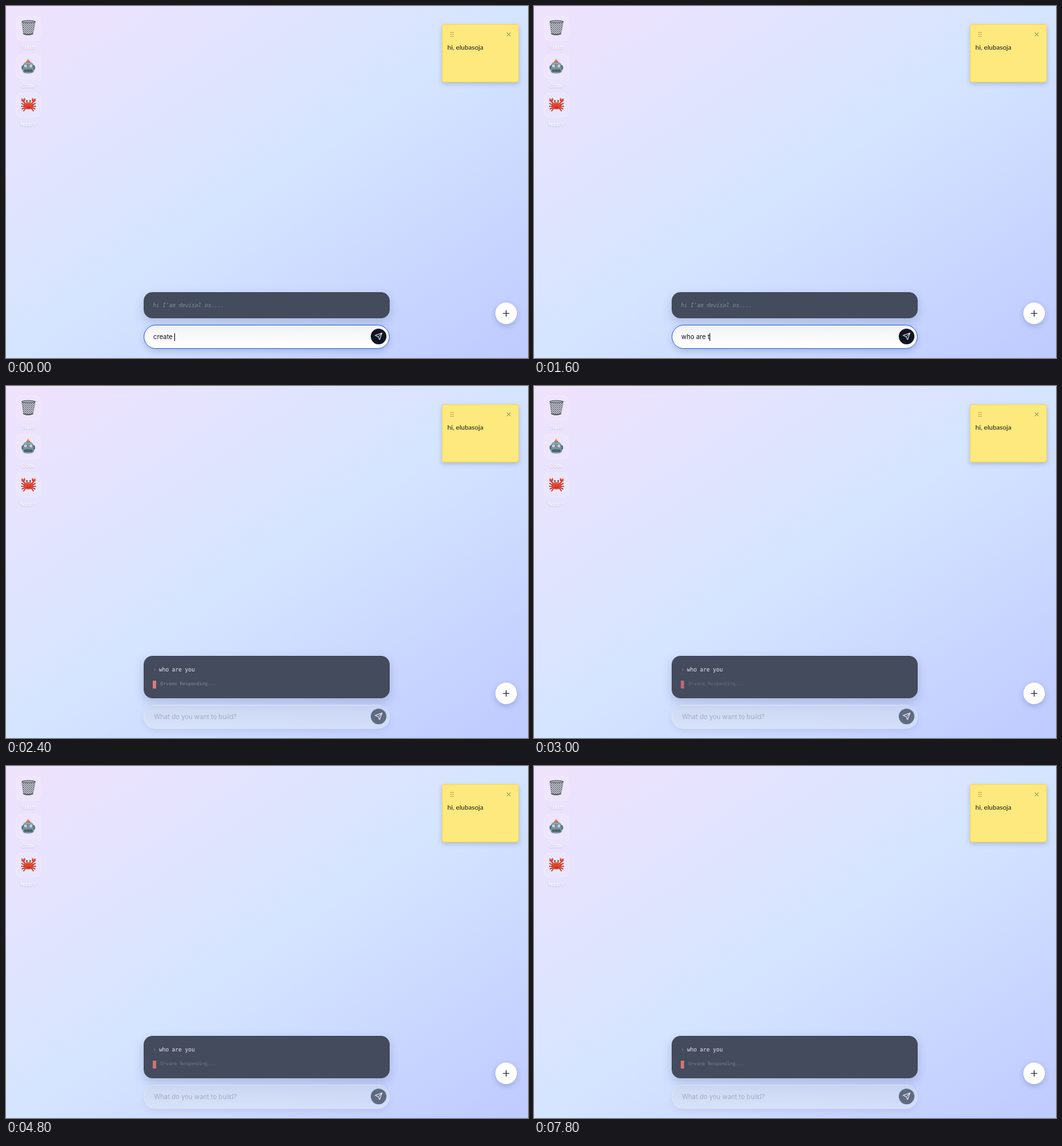
Animation of 800 by 540 pixels, one loop 8 s. Source, as an HTML page:

```html
<!DOCTYPE html>
<html lang="en">
<head>
<meta charset="utf-8">
<title>Desktop prompt</title>
<style>
  html, body { margin: 0; width: 100%; height: 100%; overflow: hidden; }
  #stage {
    position: relative; width: 800px; height: 540px; overflow: hidden;
    background: linear-gradient(to bottom right, #f0e2fd, #d5e5ff 50%, #bfcaff);
    font-family: Inter, sans-serif;
  }
  #stage div, svg { position: absolute; box-sizing: border-box; white-space: pre; }
  svg { left: 0; top: 0; }

  .cell {
    left: 15px; width: 38px; height: 38px; border-radius: 8px;
    background: rgba(255,255,255,.13); border: 1px solid rgba(255,255,255,.16);
  }
  .label {
    left: 4px; width: 60px; height: 12px; line-height: 12px; text-align: center;
    font-size: 8.1px; font-weight: 500; color: #fff;
    text-shadow: 0 1px 2px rgba(70,80,120,.25);
  }
  .note {
    left: 668px; top: 28px; width: 118px; height: 89px; border-radius: 4px;
    background: #fde97d; border: 1px solid #f9da45;
    box-shadow: 0 3px 7px rgba(60,70,110,.25);
    padding: 28px 0 0 7.5px; font: 10.2px/13px Lato, sans-serif; color: #17181c;
  }
  .plus {
    left: 750px; top: 455px; width: 33px; height: 33px; border-radius: 50%;
    background: #fff; box-shadow: 0 3px 8px rgba(40,50,100,.24);
  }

  .panel {
    left: 211px; top: 439px; width: 377px; height: 40px; border-radius: 13px;
    background: #434b5c; border: 1px solid #3e4657;
    box-shadow: 0 6px 15px rgba(50,60,110,.22);
    font: 8.25px/12px "DejaVu Sans Mono", monospace;
  }
  .reply .panel { top: 414px; height: 65px; }
  .greeting { left: 13px; top: 13px; font-style: italic; color: #858b98; }
  .chevron { left: 13.5px; top: 14px; color: #a18d97; }
  .question { left: 22.5px; top: 14px; color: #e8eaee; }
  .status { left: 24.5px; top: 36px; font-size: 7.1px; color: #9ca3af; }
  .spinner {
    left: 13px; top: 37px; width: 5px; height: 12px;
    background: conic-gradient(#b8616b 25%, #ff8583 0) 0 0 / 2px 2px;
  }
  .spinner.solid { background: #e8747b; }

  .prompt {
    left: 210.5px; top: 488.5px; width: 377px; height: 37px; border-radius: 18.5px;
    background: linear-gradient(#f0f2f5, #fff 85%); border: 1.2px solid #2867e6;
    box-shadow: 0 4px 10px rgba(50,60,110,.2);
    padding-left: 14.3px; font-size: 9.9px; line-height: 35px; color: #111319;
  }
  .prompt span { display: inline-block; vertical-align: middle; }
  .caret { width: 1px; height: 12px; background: #111; }
  .hint { color: #a3adc0; }
  .reply .prompt {
    background: linear-gradient(rgba(202,213,235,.65), rgba(221,230,247,.6));
    border-color: rgba(255,255,255,.24); box-shadow: 0 4px 10px rgba(50,60,110,.09);
  }
  .reply .caret { visibility: hidden; }
  .send {
    left: 559px; top: 495px; width: 24px; height: 24px;
    border-radius: 50%; background: #0f1524;
  }
  .reply .send { background: #5f6a83; }
  .idle-only { display: block; }
  .reply-only, .reply .idle-only { display: none; }
  .reply .reply-only { display: block; }
</style>
</head>
<body>
<div id="stage">
  <div class="cell" style="top:15px"></div><div class="label" style="top:57px">Trash</div>
  <div class="cell" style="top:74px"></div><div class="label" style="top:116px">Code</div>
  <div class="cell" style="top:133px"></div><div class="label" style="top:175px">Nipp'r</div>
  <div class="note">hi, elubasoja</div>
  <div class="plus"></div>

  <div class="panel">
    <div class="greeting idle-only">hi I'am devisal os....</div>
    <div class="chevron reply-only">›</div>
    <div class="question reply-only">who are you</div>
    <div class="spinner reply-only"></div>
    <div class="status reply-only">Orvane Responding...</div>
  </div>
  <div class="prompt"><span class="typed"></span><span class="caret"></span><span class="hint">What do you want to build?</span></div>
  <div class="send"></div>

  <svg width="800" height="540" fill="none" stroke-linecap="round" stroke-linejoin="round">
    <defs>
      <pattern id="mesh" width="3" height="3" patternUnits="userSpaceOnUse">
        <path d="M0 0L3 3M3 0L0 3" stroke="#60656e" stroke-width=".7"/>
      </pattern>
    </defs>

    <!-- bin -->
    <path d="M24.3 24L27 43Q34 45.5 41 43L44.7 24Z" fill="#c9cbd5"/>
    <path d="M24.3 24L27 43Q34 45.5 41 43L44.7 24Z" fill="url(#mesh)" stroke="#747984" stroke-width=".8"/>
    <ellipse cx="34.5" cy="24" rx="10.3" ry="1.8" fill="#a3a7b0" stroke="#555a63"/>
    <path d="M27 42.5Q34 45.5 41 42.5" stroke="#4c5059" stroke-width="1.4"/>

    <!-- robot -->
    <path d="M34 82V86" stroke="#e0a33e" stroke-width="2"/>
    <path d="M30.5 87Q31 83 34 83T37.5 87Z" fill="#e5783c"/>
    <rect x="24" y="91" width="20.5" height="7" rx="2" fill="#4d6677"/>
    <path d="M26 92Q27 86 34 86T42.3 92V100Q42 103 34 103T26 100Z" fill="#7897a5" stroke="#587481" stroke-width=".7"/>
    <path d="M28 89Q34 86 40 89" stroke="#abc3cb"/>
    <g fill="#eef4f4" stroke="#53646e" stroke-width=".8">
      <circle cx="30" cy="92" r="2.7"/><circle cx="38.3" cy="92" r="2.7"/>
    </g>
    <circle cx="30" cy="92" r="1" fill="#67a7bc"/><circle cx="38.3" cy="92" r="1" fill="#67a7bc"/>
    <path d="M34.1 93.5L35.3 96H33Z" fill="#d16d46"/>
    <rect x="28" y="97.5" width="12.5" height="3.2" rx="1.2" fill="#324753"/>
    <path d="M30 99H39" stroke="#cbd8d8" stroke-width="1.2" stroke-dasharray="1 1.5" stroke-linecap="butt"/>

    <!-- crab, one side mirrored -->
    <g id="crabSide">
      <path d="M29 152L24 149.5M28 154L23.5 154M28.5 156L24.5 158M30 157L27 161" stroke="#b52a1c" stroke-width="1.4"/>
      <path d="M29 149L26 146" stroke="#d43823" stroke-width="1.8"/>
      <path d="M27.5 147Q21.5 147 24.5 141L26.3 144L28.5 140.8Q31 145 27.5 147Z" fill="#df422a"/>
      <path d="M32 149V145.5" stroke="#b52a1c"/>
      <circle cx="32" cy="145.5" r="1.1" fill="#35201f"/>
    </g>
    <use href="#crabSide" transform="translate(69 0) scale(-1 1)"/>
    <ellipse cx="34.5" cy="153" rx="7.4" ry="5.5" fill="#df422a"/>
    <path d="M30 150.5Q34.5 147.5 39 150.5" stroke="#f37953"/>
    <path d="M32 155.5Q34.5 157 37 155.5" stroke="#8d2018" stroke-width=".8"/>

    <!-- note controls -->
    <path d="M682 40.5V46.6M685 40.5V46.6" stroke="#84793f" stroke-width="1.4" stroke-dasharray="0 3"/>
    <path d="M768 41L773 46M773 41L768 46" stroke="#766d3f" stroke-width=".9"/>

    <path d="M762 471.5H771M766.5 467V476" stroke="#1f2630" stroke-width="1.2"/>
    <path transform="translate(565 501) scale(.5)" d="M22 2L11 13M22 2L15 22L11 13L2 9Z" stroke="#fff" stroke-width="2"/>
  </svg>
</div>
<script>
  const LOOP = 8000, STEP = 200, SUBMIT = 2400, PULSE = 2000, PEAK = 2250;
  const drafts = ['create ', 'create', 'crea', 'cr', '', 'wh', 'who a', 'who are',
                  'who are t', 'who are ', 'who are y', 'who are you'];
  const find = selector => document.querySelector(selector);
  const stage = find('#stage'), typed = find('.typed'), hint = find('.hint');
  const spinner = find('.spinner'), status = find('.status');

  function render(time) {
    const tick = Math.floor(time / STEP);
    const draft = drafts[tick] || '';
    stage.classList.toggle('reply', time >= SUBMIT);
    typed.textContent = draft;
    hint.hidden = draft !== '';
    hint.style.display = draft ? 'none' : '';

    const now = tick * STEP;
    const glow = (1 + Math.cos((now - PEAK) / PULSE * 2 * Math.PI)) / 2;
    status.style.opacity = .33 + .42 * glow;
    spinner.style.opacity = .72 + .23 * glow;
    spinner.classList.toggle('solid', (now - SUBMIT) / STEP % 7 === 3);
  }

  function frame() {
    render(performance.now() % LOOP);
    requestAnimationFrame(frame);
  }
  frame();
</script>
</body>
</html>
```
